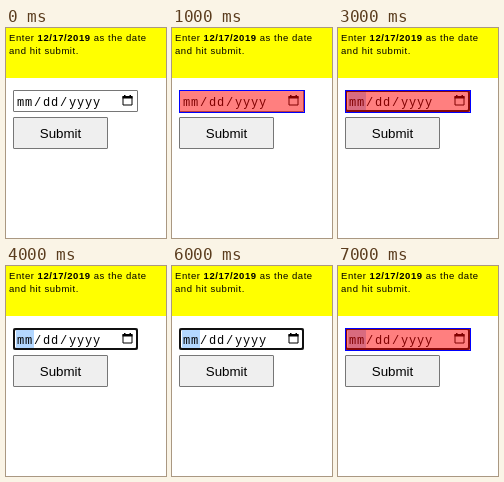
Animation, 160 px wide and 210 px high, one loop 8 s. Source, as an HTML page:

```html
<!DOCTYPE html>
<html lang="en">
<head>
<meta charset="utf-8">
<title>Date entry</title>
<style>
  html, body { margin: 0; width: 100%; height: 100%; overflow: hidden; background: #fff; }
  .stage div, .stage span { box-sizing: border-box; }
  .stage { position: relative; width: 160px; height: 210px; overflow: hidden;
    font: 10px/13px "Liberation Sans", Arial, sans-serif; color: #000; }
  .stage > *, .date > * { position: absolute; }
  .task { left: 0; top: 0; width: 160px; height: 50px; padding: 3px; background: #ff0;
    font-size: 9.5px; letter-spacing: .54px; white-space: nowrap; }
  .date { left: 7px; top: 62px; width: 125px; height: 22px; border: 1px solid #767676; border-radius: 1px;
    font: 12px/18px "Liberation Mono", "Courier New", monospace; letter-spacing: .8px; }
  .date span { top: 1px; height: 18px; padding: 2px 1px 0; white-space: pre; }
  .mm { left: 2px; width: 18px; }
  .s1 { left: 19px; }
  .dd { left: 28px; }
  .s2 { left: 45px; }
  .yy { left: 54px; }
  .date svg { left: 108px; top: 3px; }
  .ring { left: 7px; top: 62px; width: 125px; height: 22px; border: 2px solid #101010; border-radius: 3px; }
  .button { left: 7px; top: 89px; width: 95px; height: 32px; border: 1px solid #767676; border-radius: 1px;
    background: #efefef; font-size: 13.333px; line-height: 32px; text-align: center; }
  .flash { left: 7px; top: 62px; width: 126px; height: 23px; border: 1px solid #00f; background: rgba(255, 0, 0, .5); }

  .mm { animation: select 8s step-end infinite; }
  .ring { animation: focus 8s step-end infinite; }
  .flash { animation: blink 2s step-end infinite; }
  @keyframes select { 0% { background: transparent; } 25%, 100% { background: #b3d7ff; } }
  @keyframes focus { 0% { opacity: 0; } 25%, 100% { opacity: 1; } }
  @keyframes blink { 0% { opacity: 0; } 50%, 100% { opacity: 1; } }
</style>
</head>
<body>
<div class="stage">
  <div class="task">Enter <b>12/17/2019</b> as the date<br>and hit submit.</div>
  <div class="date">
    <span class="mm">mm</span><span class="s1">/</span><span class="dd">dd</span><span class="s2">/</span><span class="yy">yyyy</span>
    <svg width="12" height="13" viewBox="0 0 12 13">
      <path d="M1 2.5h9v8.5h-9z" fill="none" stroke="#000"/>
      <path d="M.5 2h10v2.5H.5zM2 1h1.5v1H2zM7.5 1H9v1H7.5z"/>
    </svg>
  </div>
  <div class="ring"></div>
  <div class="button">Submit</div>
  <div class="flash"></div>
</div>
</body>
</html>
```
